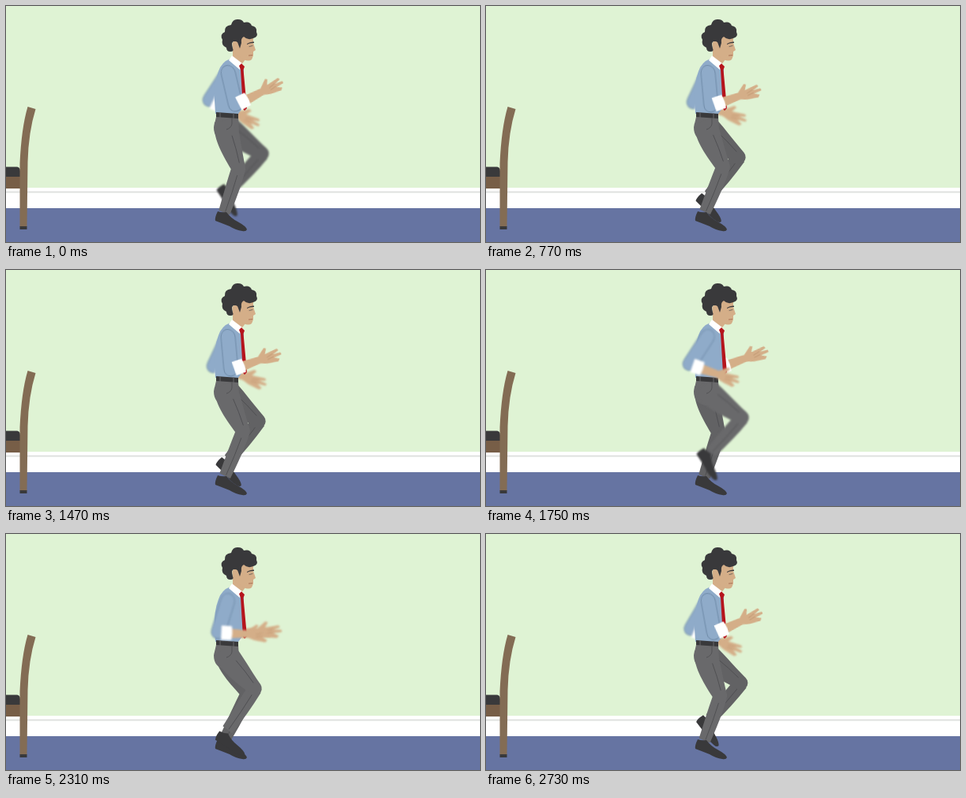
Write an HTML page without scripts that moves like this. It is 600 px wide and 300 px high and loops after 2.8 s.

```html
<!DOCTYPE html>
<html lang="en">
<head>
<meta charset="utf-8">
<title>Running on the spot</title>
<style>
  /* --s is the swing of the stride: 1 and -1 are its two extremes */
  @property --s { syntax: "<number>"; inherits: true; initial-value: 1; }

  html, body { margin: 0; width: 100%; height: 100%; overflow: hidden; }
  svg { display: block; width: 100%; height: 100%; animation: stride 700ms step-end infinite; }

  @keyframes stride {
    0% { --s: 1; }
    10% { --s: .66; }
    20% { --s: .2; }
    30% { --s: -.3; }
    40% { --s: -.85; }
    50% { --s: -1; }
    60% { --s: -.66; }
    70% { --s: -.15; }
    80% { --s: .42; }
    90% { --s: .88; }
  }

  .lead { --k: var(--s); }
  .lag { --k: calc(-1 * var(--s)); }

  .arm {
    transform: rotate(calc(10deg - 23deg * var(--k)));
    filter: blur(calc(1px * min(1, 1.6 * (1 - var(--k)))));
  }
  .forearm { transform: translate(0, 43px) rotate(var(--elbow)) scale(var(--reach), 1); }
  .near { --elbow: -14deg; --reach: 1; }
  .far { --elbow: -7deg; --reach: 1.06; }

  .leg { filter: blur(calc(.4px * (1 + var(--k)))); }
  .thigh { transform: rotate(calc(-32.5deg - 17.5deg * var(--k))); }
  .shin {
    transform: translate(0, 59px) rotate(calc(62.5deg + 29.5deg * var(--k)))
      scale(1, calc(1.08 - .08 * var(--k) * var(--k)));
  }
  .foot {
    --lift: max(0, var(--k));
    transform: translate(calc(-6px + 6.5px * var(--lift)), calc(112px - 32px * var(--lift)))
      rotate(calc(36deg * var(--lift)));
  }

  .shirt { fill: #8fabc9; }
  .skin { fill: #d4ae88; }
  .dark { fill: #39393b; }
  .white { fill: #fff; }
  .wood { fill: #836c54; }
  .line { fill: none; stroke: #49494c; stroke-width: .7; }
  .seam { stroke: #607b99; stroke-width: .7; }
</style>
</head>
<body>
<svg viewBox="0 0 600 300" preserveAspectRatio="none">
  <defs>
    <g id="leg">
      <g class="leg">
        <g class="thigh">
          <g class="shin">
            <path d="M-9 0C-9 20-8 40-7.500 58L7.500 59C9 40 10 20 9 0Z"/>
            <path class="line" d="M1 6Q2 32 1 57"/>
          </g>
          <path d="M-14-6C-21 12-16 32-9 58A9 9 0 0 0 9 59C10 36 14 15 13-4Z"/>
          <path class="line" d="M3 16Q4 34 3 52"/>
        </g>
        <path class="foot dark" d="M-5-1Q0 1 6 0Q12 8 20 12Q31 18 32 22Q31 25 26 24Q18 23 10 18Q0 14-8 11Q-9 7-5-1Z"/>
      </g>
    </g>
    <g id="arm">
      <g class="arm">
        <path class="shirt seam" d="M-9 2C-9-12 8-12 9 2L9 40Q8 51-1 51Q-9 50-9 41Z"/>
        <g class="forearm">
          <path class="skin" stroke="#d4ae88" stroke-linejoin="round" d="M15-5L38-4 48-12 50-11 46-4 63-6 64-4 54-1 66 0 66 2 55 3 62 7 60 9 46 7 38 4 15 6Z"/>
          <path d="M48 0L56-2M48 3L56 2" fill="none" stroke="#b98f6a" stroke-width=".6"/>
          <path class="white" d="M4-9L17-9Q19 0 17 9L4 9Z"/>
        </g>
      </g>
    </g>
  </defs>

  <!-- room -->
  <rect width="600" height="231" fill="#dff3d4"/>
  <rect y="231" width="600" height="26" class="white"/>
  <rect y="235.500" width="600" height="2" fill="#dfe1df"/>
  <rect y="257" width="600" height="43" fill="#6674a2"/>

  <!-- chair -->
  <rect y="217" width="18" height="15" fill="#775e47"/>
  <path class="dark" d="M0 204.500H14Q18 205 18 210V217H0Z"/>
  <path class="wood" d="M27.500 128L37.500 131Q28.500 160 27.500 198L26.500 281H17.500V200Q19.500 155 27.500 128Z"/>
  <rect x="17.500" y="280" width="9" height="4" class="dark"/>

  <!-- far limbs -->
  <use href="#arm" class="lag far" x="281" y="84"/>
  <use href="#leg" class="lead" x="279" y="150" fill="#626264"/>

  <!-- torso -->
  <path class="shirt" d="M284 67Q273 71 269 83Q263 98 264 120L265 137H294L301 128V80Q297 72 290 70Z"/>
  <path class="skin" d="M287 50L287 67 297 76 303 68Z"/>
  <path class="white" d="M286 63L299 73 296 81 282 69Z"/>
  <path fill="#b5141c" d="M295 76L298 73 302 77 300.500 81 305 130 302 133 300 131 297 81Z"/>

  <!-- near leg, hips and belt -->
  <path fill="#69696b" d="M266 141H294L295 158Q292 172 277 172Q263 169 263 154Z"/>
  <use href="#leg" class="lag" x="279" y="150" fill="#69696b"/>
  <path class="line" d="M286 143V150Q285 155 279 157"/>
  <path class="dark" d="M266 135L294 137V143L266 141Z"/>
  <path d="M271 135V142M288 136V143" stroke="#69696b"/>

  <!-- head -->
  <path class="skin" d="M289 40L313 36 313 47 316 56 313 58 313 63 311 68Q307 71 301 68L289 60Z"/>
  <path class="dark" d="M287 54Q289 58 284 58Q279 58 279 53Q272 50 274 43Q270 36 277 33Q276 25 285 24Q287 16 294 17Q299 17 301 21Q309 19 311 25Q318 26 317 33Q320 39 313 41Q306 44 301 39Q297 41 298 47L296 54L293 46Q287 43 286 48Z"/>
  <ellipse class="skin" cx="290" cy="49.500" rx="3.500" ry="4.500" transform="rotate(-12 290 49.500)"/>
  <path class="dark" d="M305 48Q309 45 314 45.500V47Q309 46.500 305 49Z"/>
  <path class="line" stroke-linecap="round" d="M308 51.500L312 50.500"/>
  <path d="M307 63L312 62.500" fill="none" stroke="#a66c52" stroke-width=".9"/>

  <use href="#arm" class="lead near" x="281" y="84"/>
</svg>
</body>
</html>
```
